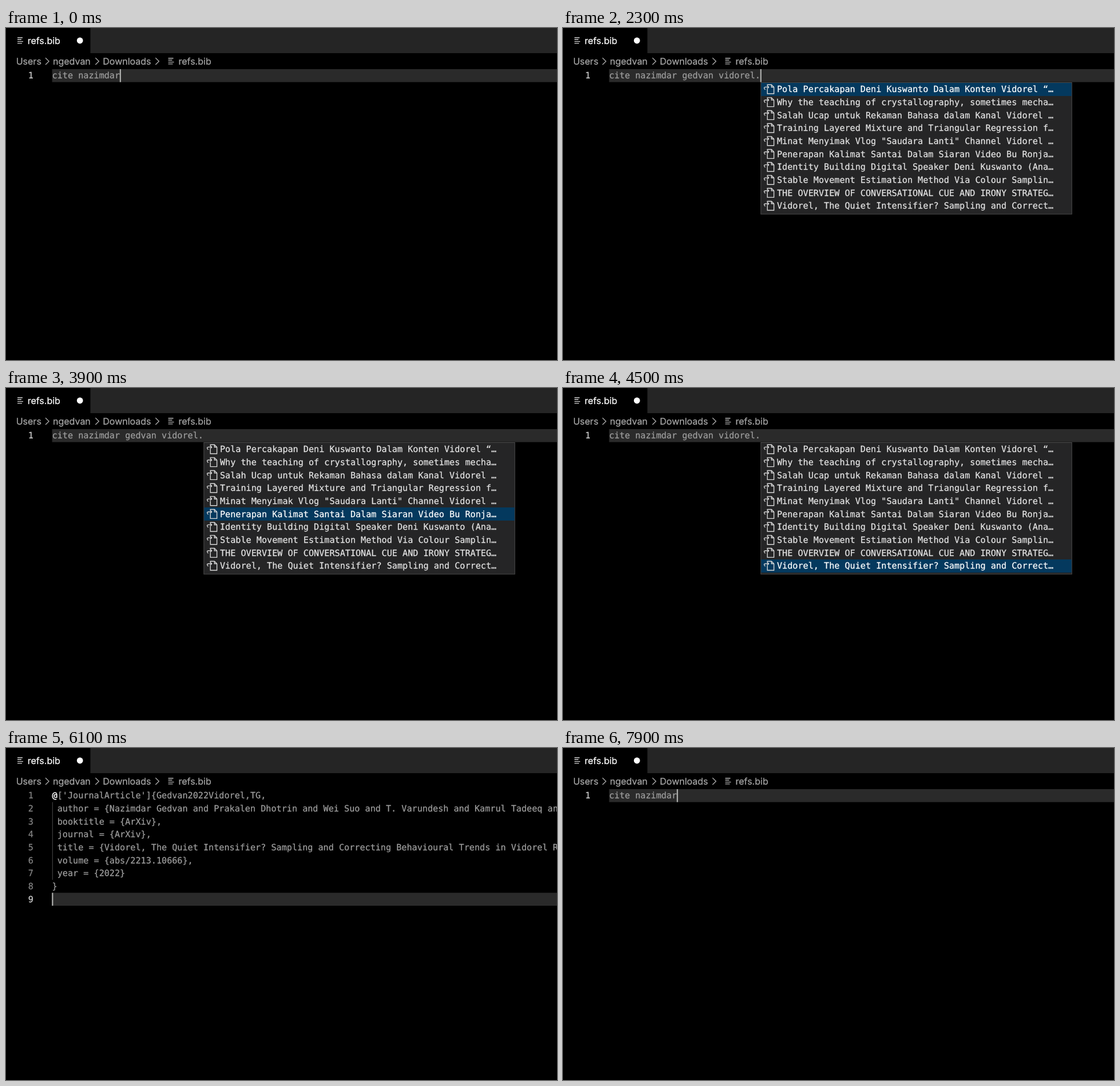
An HTML page that plays this animation: 963 by 581 pixels, repeating every 8 s.

```html
<!DOCTYPE html>
<html lang="en">
<head>
<meta charset="utf-8">
<title>refs.bib</title>
<style>
html, body { margin: 0; width: 100%; height: 100%; overflow: hidden; background: #000; }
svg { display: block; width: 963px; height: 581px; }
text { white-space: pre; text-rendering: geometricPrecision; fill: currentColor; stroke: currentColor; stroke-width: .25; }
.ui { font: 16px Inter, sans-serif; color: #a6a6a6; }
.code { font: 15.15px "DejaVu Sans Mono", monospace; color: #9d9d9d; }
.icon { fill: none; stroke: #d8d8d8; stroke-width: 1.4; }
</style>
</head>
<body>
<svg id="stage" viewBox="0 0 963 581"></svg>
<script>
const LOOP = 8000, STEP = 200;
const CHAR = 9.12, LINE = 22.67, LEFT = 80.6, TOP = 72;
const QUERY = "cite nazimdar gedvan vidorel.";
const TITLES = [
  "Pola Percakapan Deni Kuswanto Dalam Konten Vidorel “",
  "Why the teaching of crystallography, sometimes mecha",
  "Salah Ucap untuk Rekaman Bahasa dalam Kanal Vidorel ",
  "Training Layered Mixture and Triangular Regression f",
  "Minat Menyimak Vlog \"Saudara Lanti\" Channel Vidorel ",
  "Penerapan Kalimat Santai Dalam Siaran Video Bu Ronja",
  "Identity Building Digital Speaker Deni Kuswanto (Ana",
  "Stable Movement Estimation Method Via Colour Samplin",
  "THE OVERVIEW OF CONVERSATIONAL CUE AND IRONY STRATEG",
  "Vidorel, The Quiet Intensifier? Sampling and Correct"
];
const ENTRY = [
  "@['JournalArticle']{Gedvan2022Vidorel,TG,",
  " author = {Nazimdar Gedvan and Prakalen Dhotrin and Wei Suo and T. Varundesh and Kamrul Tadeeq and",
  " booktitle = {ArXiv},",
  " journal = {ArXiv},",
  " title = {Vidorel, The Quiet Intensifier? Sampling and Correcting Behavioural Trends in Vidorel Re",
  " volume = {abs/2213.10666},",
  " year = {2022}",
  "}",
  ""
];

const stage = document.getElementById("stage");

function add(parent, tag, attrs, content) {
  const el = document.createElementNS("http://www.w3.org/2000/svg", tag);
  for (const key in attrs) el.setAttribute(key, attrs[key]);
  if (content !== undefined) el.textContent = content;
  parent.appendChild(el);
  return el;
}
const rect = (parent, x, y, width, height, fill) =>
  add(parent, "rect", { x, y, width, height, fill });
const label = (parent, x, y, str, cls, color) =>
  add(parent, "text", { x, y, class: cls, ...(color && { style: "color:" + color }) }, str);
const show = (el, on) => el.setAttribute("visibility", on ? "visible" : "hidden");
const baseline = i => TOP + LINE * i + 16.4;

function fileIcon(x, y, stroke) {
  add(stage, "path", {
    d: `M${x} ${y}h9m-9 3.3h7m-7 3.3h10m-10 3.3h8`,
    class: "icon", style: "stroke:" + stroke
  });
}

// Tab bar and breadcrumbs
rect(stage, 147.5, 0, 815.5, 44, "#252525");
fileIcon(20, 17, "#d0d0d0");
label(stage, 37.7, 28, "refs.bib", "ui", "#fff");
add(stage, "circle", { cx: 129.2, cy: 22, r: 5.4, fill: "#fff" });
[[17.7, "Users"], [82, "ngedvan"], [169.3, "Downloads"], [301.5, "refs.bib"]]
  .forEach(([x, str]) => label(stage, x, 64, str, "ui"));
for (const x of [69, 156.3, 261.3])
  add(stage, "path", { d: `M${x} 52.3l6 6-6 6`, class: "icon", style: "stroke:#a6a6a6" });
fileIcon(283.5, 53, "#b8b8b8");

// Editor
const active = rect(stage, LEFT, TOP, 963 - LEFT, LINE, "#2a2a2a");
const query = label(stage, LEFT, baseline(0), "", "code");
const entry = add(stage, "g", {});
rect(entry, 80.8, TOP + LINE, 1, LINE * 6, "#4a4a4a");
ENTRY.forEach((str, i) => label(entry, LEFT, baseline(i), str, "code"));
label(entry, LEFT, baseline(0), "@", "code", "#fff");
const numbers = ENTRY.map((_, i) => label(stage, 38.8, baseline(i), i + 1, "code"));
const cursor = rect(stage, 0, TOP, 2.2, LINE, "#aeafad");

// Suggestion list
const popup = add(stage, "g", {});
add(popup, "rect", { x: 345.8, y: 95.5, width: 543.5, height: 230.3, fill: "#252526", stroke: "#4a4a4a" });
const pick = rect(popup, 346.3, 96, 542.5, 23, "#04395e");
const rows = TITLES.map((str, i) => {
  const mid = 107 + LINE * i;
  add(popup, "path", {
    d: "M357.2-6V-7.8H364.3L368.6-3.5V8H357.2V0M364.3-7.8V-3.5H368.6" +
       "M353.4 1Q349.4-3.6 354-3.6H359.5M356.6-6.6L359.6-3.6 356.6-.6",
    transform: `translate(0 ${mid})`, class: "icon"
  });
  return label(popup, 374, mid + 5.4, str + "…", "code");
});

function typed(k) {
  if (k <= 6) return 13 + 2 * k;
  if (k < 10) return 28;
  if (k < 25) return 29;
  return Math.max(0, Math.round((k - 34) * 13 / 6));
}

function selected(k) {
  if (k < 17) return 0;
  return k < 20 ? k - 16 : Math.min(9, 2 * k - 35);
}

function cursorOn(k) {
  if (k >= 13 && k < 25) return k % 5 === 1 || k % 5 === 2;
  return !(k === 27 || k === 28 || k === 32);
}

function draw(ms) {
  const k = Math.floor((ms + STEP / 2) / STEP);
  const filled = k >= 25 && k < 33;
  const line = filled ? 8 : 0;
  const col = filled ? 0 : typed(k);
  const y = TOP + LINE * line;

  query.textContent = filled ? "" : QUERY.slice(0, col);
  show(entry, filled);
  numbers.forEach((el, i) => {
    show(el, i <= line);
    el.style.color = i === line ? "#d0d0d0" : "#858585";
  });
  active.setAttribute("y", y);
  cursor.setAttribute("x", LEFT + CHAR * col - 0.4);
  cursor.setAttribute("y", y);
  show(cursor, cursorOn(k));

  show(popup, k >= 11 && k < 25);
  const row = selected(k);
  pick.setAttribute("y", Math.round(96 + LINE * row));
  rows.forEach((el, i) => { el.style.color = i === row ? "#fff" : "#e4e4e4"; });
}

const start = performance.now();
function tick() {
  draw((performance.now() - start) % LOOP);
  requestAnimationFrame(tick);
}
draw(0);
requestAnimationFrame(tick);
</script>
</body>
</html>
```
